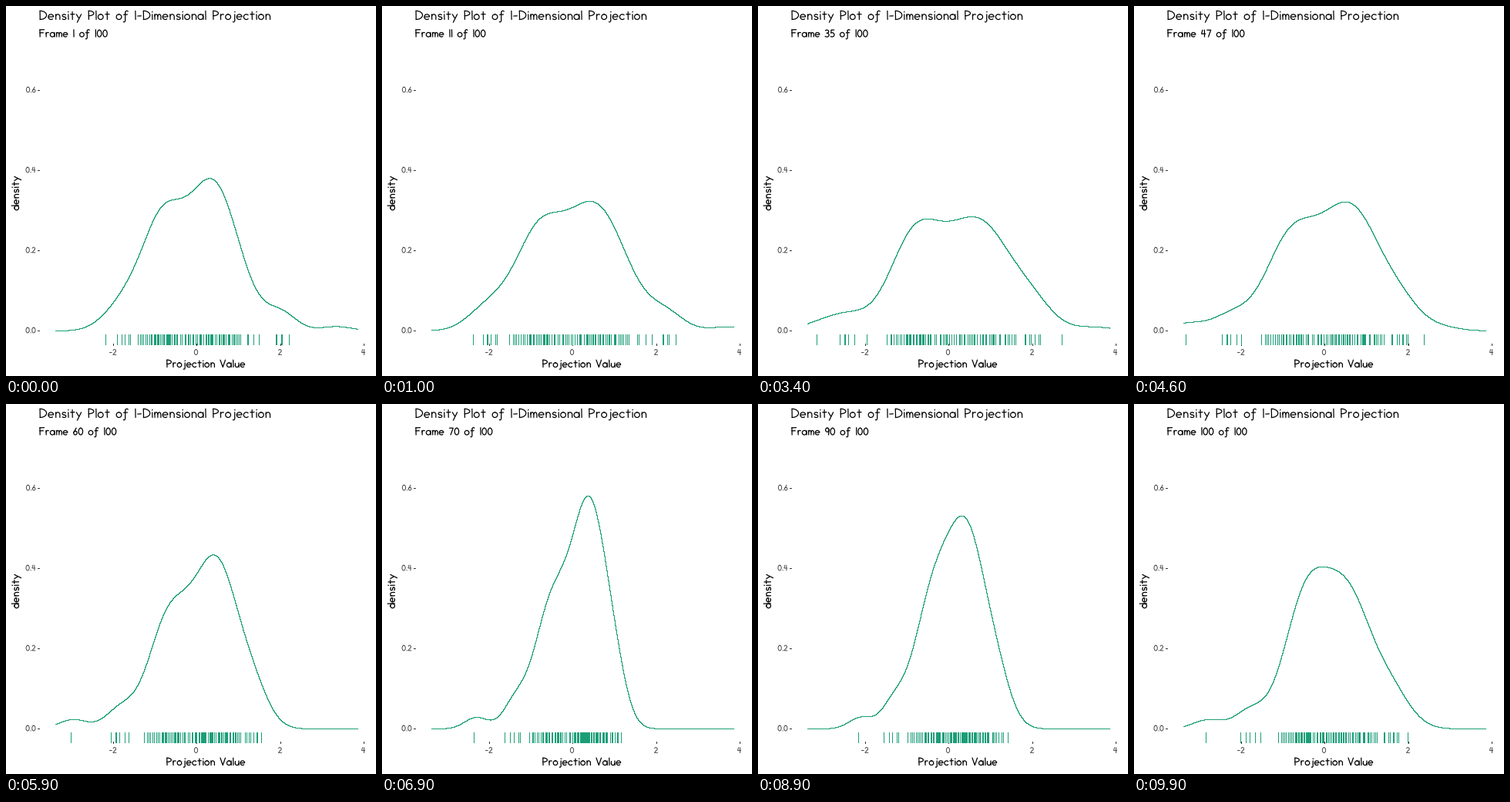
Recreate the animation shown at these times as a matplotlib script. Size 480 by 480 pixels, loop 10 s.

```python
import numpy as np
import matplotlib.pyplot as plt
from matplotlib.animation import FuncAnimation
from matplotlib.collections import LineCollection

SIZE, DPI = 480, 100
FRAMES, INTERVAL = 100, 100
GREEN, GREY = "#1B9E77", "#4D4D4D"
PX = 72 / DPI


def to_x(v):
    return 246.5 + 54.25 * v


def to_y(d):
    return 420.5 - 520 * d


def centre(p):
    """Snap to the middle of a pixel."""
    return np.floor(p) + 0.5


# ---- handwriting, built from lines and arcs on a shared baseline ----

X, CAP = 6, 10


def line(*pts):
    return np.array(pts, float)


def arc(cx, cy, rx, ry, start=90, stop=450):
    a = np.radians(np.linspace(start, stop, 25))
    return np.column_stack([cx + rx * np.cos(a), cy + ry * np.sin(a)])


def stem(x=0.5, top=X):
    return line((x, top), (x + 0.2, 0))


def bar(y, width):
    return line((0.3, y), (width, y + 0.2))


def dot(x, y=8.5):
    return line((x, y), (x + 0.2, y + 0.7))


def arch(x, w):
    return np.vstack([arc(x + w / 2, 3.2, w / 2, 2.8, 170, 0), [(x + w, 0)]])


def lobe(low, high, w):
    return arc(0.5, (low + high) / 2, w, (high - low) / 2, 90, -90)


def hook(x, top):
    return np.vstack([[(x, top)], arc(x - 1.4, -1, 1.4, 1.9, 0, -120)])


BOWL = arc(3, 3, 3, 3)

GLYPHS = {
    "D": [stem(top=CAP), lobe(0, CAP, 7.6)],
    "P": [stem(top=CAP), lobe(4.3, CAP, 6)],
    "F": [stem(top=CAP), bar(9.8, 6.5), bar(5.5, 5.2)],
    "V": [line((0, CAP), (3.5, 0), (7, CAP))],
    "a": [BOWL, stem(6)],
    "c": [arc(3, 3, 3, 3, 45, 315)],
    "d": [BOWL, stem(6, CAP)],
    "e": [bar(3, 5.8), arc(3, 3, 3, 3, 8, 310)],
    "f": [arc(4, 8, 1.8, 2, 40, 180), hook(2.2, 8), bar(5.6, 4.7)],
    "i": [stem(), dot(0.5)],
    "j": [hook(2.6, X), dot(2.6)],
    "l": [stem(top=CAP)],
    "m": [stem(), arch(0.5, 3.6), arch(4.1, 3.6)],
    "n": [stem(), arch(0.5, 4.8)],
    "o": [BOWL],
    "r": [stem(), arc(2.9, 3.2, 2.4, 2.8, 170, 60)],
    "s": [arc(2.8, 4.5, 2, 1.5, 30, 270), arc(2.8, 1.5, 2.2, 1.5, 90, -150)],
    "t": [stem(2.4, 9), bar(X, 5)],
    "u": [line((0.4, X), (0.4, 2.6)), arc(2.9, 2.6, 2.5, 2.6, 180, 360), stem(5.4)],
    "y": [line((0, X), (2.9, 1.4)), line((5.6, X), (1, -3.3))],
    "0": [arc(2.9, 4.7, 2.9, 4.7)],
    "1": [stem(top=CAP)],
    "2": [arc(2.6, 7, 2.4, 2.5, 160, -30), line((4.7, 5.8), (0, 0.2), (5.6, 0.2))],
    "3": [arc(2, 7.3, 2.6, 2.2, 140, -90), arc(2, 2.5, 3, 2.6, 90, -140)],
    "4": [line((1.6, 9.5), (0.2, 4.2), (5.8, 4.2)), stem(4.2, 9.5)],
    "5": [line((5, 9.5), (1, 9.5), (0.8, 5.4)), arc(2.2, 2.9, 3, 2.9, 120, -130)],
    "6": [arc(2.7, 2.6, 2.4, 2.6), line((0.4, 3.2), (4, 9.5))],
    "7": [line((0, 9.4), (5.2, 9.4), (1.8, 0))],
    "8": [arc(2.7, 7.2, 2, 2.2), arc(2.7, 2.5, 2.5, 2.5)],
    "9": [arc(2.6, 6.8, 2.4, 2.7), line((5, 7.3), (4.4, 0))],
    ".": [dot(0.5, 0)],
    "-": [bar(4, 4.4)],
}
GAP, SPACE = 2.1, 6


def layout(text, x, y, scale, align=0.0, upright=False):
    """Pen strokes of a text in stage pixels."""
    pen, out = 0.0, []
    for char in text:
        if char == " ":
            pen += SPACE
            continue
        out += [s + [pen, 0] for s in GLYPHS[char]]
        pen += max(s[:, 0].max() for s in GLYPHS[char]) + GAP
    shift = align * (pen - GAP)
    for k, s in enumerate(out):
        u, v = (s[:, 0] - shift) * scale, s[:, 1] * scale
        out[k] = np.column_stack([x - v, y - u] if upright else [x + u, y - v])
    return out


# ---- projected data: six drifting groups of 100 points ----

def spline(x, y, q):
    """Natural cubic spline through y over x, sampled at q."""
    x, y = np.asarray(x, float), np.asarray(y, float)
    n, h = len(x), np.diff(x)
    slope = np.diff(y) / h
    a, r = np.eye(n), np.zeros(n)
    for i in range(1, n - 1):
        a[i, i - 1:i + 2] = h[i - 1], 2 * (h[i - 1] + h[i]), h[i]
        r[i] = 6 * (slope[i] - slope[i - 1])
    m = np.linalg.solve(a, r)
    k = np.clip(np.searchsorted(x, q, "right") - 1, 0, n - 2)
    s = (x[k + 1] - q) / h[k]
    t = 1 - s
    bend = (s**3 - s) * m[k] + (t**3 - t) * m[k + 1]
    return s * y[k] + t * y[k + 1] + bend * h[k]**2 / 6


def track(*keys):
    return spline([0, 20, 34, 46, 59, 79, 99], keys, np.arange(FRAMES))


N = 100
# far left, left, left hump, right hump, right, far right
WEIGHTS = np.array([0.02, 0.04, 0.32, 0.57, 0.04, 0.01])
MEANS = np.column_stack([
    track(-2.13, -2.6, -3.1, -3.28, -2.96, -1.86, -2.8),
    track(-1.7, -2.2, -2.4, -2.25, -1.85, -1.15, -1.8),
    track(-0.87, -0.86, -0.85, -0.85, -0.69, -0.4, -0.53),
    track(0.38, 0.65, 0.68, 0.6, 0.46, 0.4, 0.5),
    track(2, 2.3, 2.05, 1.88, 1.37, 0.9, 1.65),
    track(3.33, 3.83, 3.49, 2.74, 1.56, 1.06, 2.11),
])
LEFT_SD = track(0.5, 0.62, 0.6, 0.6, 0.49, 0.41, 0.5)
RIGHT_SD = track(0.62, 0.82, 0.83, 0.74, 0.55, 0.38, 0.66)
TIGHT = 0.11

rng = np.random.default_rng(7)
ranks = (np.arange(N) + 0.5 + rng.uniform(-0.8, 0.8, N)).clip(0.5, N - 0.5) / N
fine = np.linspace(-4, 4.5, 2000)
columns = np.arange(63, 456) + 0.5
values = (columns - 246.5) / 54.25


def mixture(x, means, sds):
    z = (x[:, None] - means) / sds
    return (WEIGHTS / sds * np.exp(-z**2 / 2)).sum(axis=1) / np.sqrt(2 * np.pi)


def project(i):
    """Smoothed density and rug positions at one step."""
    means = MEANS[i]
    sds = np.array([TIGHT, TIGHT, LEFT_SD[i], RIGHT_SD[i], TIGHT, TIGHT])
    spread = np.sqrt(WEIGHTS @ (sds**2 + means**2) - (WEIGHTS @ means)**2)
    band = 0.34 * spread
    humps = sds > TIGHT
    smooth = np.where(humps, sds, np.hypot(sds, band))
    core = np.where(humps, np.sqrt(np.maximum(sds**2 - band**2, TIGHT**2)), sds)
    cdf = np.cumsum(mixture(fine, means, core))
    return mixture(values, means, smooth), np.interp(ranks, cdf / cdf[-1], fine)


# ---- stage ----

fig = plt.figure(figsize=(SIZE / DPI, SIZE / DPI), dpi=DPI, facecolor="white")
ax = fig.add_axes([0, 0, 1, 1])
ax.set(xlim=(0, SIZE), ylim=(SIZE, 0))
ax.axis("off")


def strokes(segments, color="black", width=1.25):
    lines = LineCollection(segments, colors=color, linewidths=width * PX,
                           capstyle="round")
    return ax.add_collection(lines, autolim=False)


def hairlines(segments, color):
    lines = LineCollection(segments, colors=color, linewidths=PX, antialiaseds=False)
    return ax.add_collection(lines, autolim=False)


TITLE, BODY, SMALL = 1.12, 0.935, 0.73
strokes(layout("Density Plot of 1-Dimensional Projection", 43.5, 17.5, TITLE))
strokes(layout("Projection Value", 259, 468.5, BODY, 0.5))
strokes(layout("density", 16.5, 243, BODY, 0.5, True))

marks = []
for v in (-2, 0, 2, 4):
    x = centre(to_x(v))
    marks.append([(x, 438), (x, 440)])
    strokes(layout(str(v), x, 452.5, SMALL, 0.5), GREY, 1)
for d in (0, 0.2, 0.4, 0.6):
    y = centre(to_y(d))
    marks.append([(41, y), (43, y)])
    strokes(layout(f"{d:.1f}", 38, y + 3.5, SMALL, 1), GREY, 1)
hairlines(marks, "#333333")

subtitle = strokes([])
rug = hairlines([], GREEN)
curve, = ax.plot([], [], color=GREEN, lw=PX, antialiased=False, drawstyle="steps-post")


def draw(i):
    density, points = project(i)
    subtitle.set_segments(layout(f"Frame {i + 1} of {FRAMES}", 43.5, 40, BODY))
    rug.set_segments([[(x, 426), (x, 438.5)] for x in centre(to_x(points))])
    curve.set_data(columns, centre(to_y(density)))
    return subtitle, rug, curve


anim = FuncAnimation(fig, draw, frames=FRAMES, interval=INTERVAL, repeat=True)
plt.show()
```
